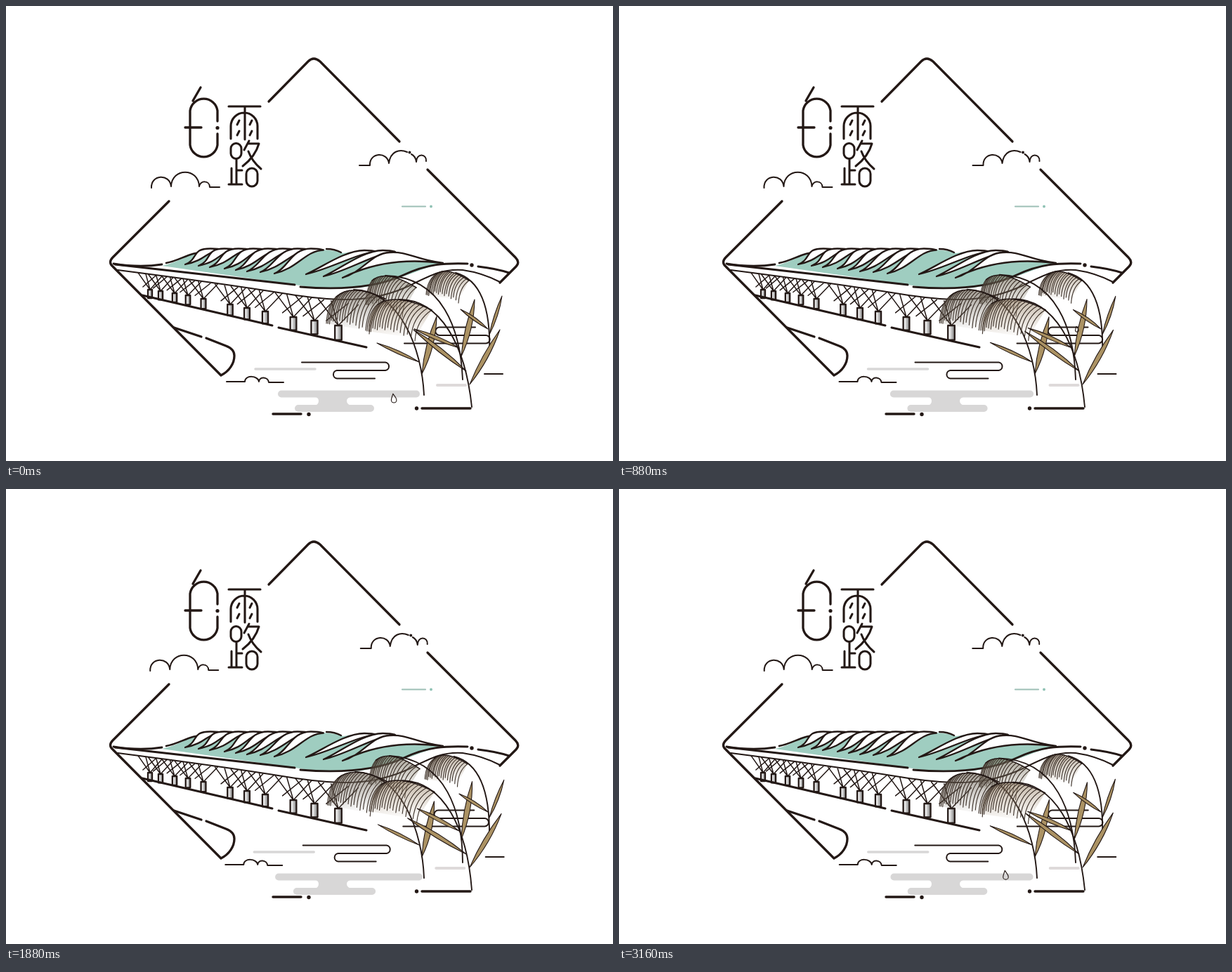
These frames come from a looping animation (864x648 px, 3200 ms). An HTML page with a canvas:

```html
<!DOCTYPE html>
<html lang="zh">
<head>
<meta charset="utf-8">
<style>
html, body { margin: 0; width: 100%; height: 100%; overflow: hidden; background: #fff; }
canvas { display: block; }
</style>
</head>
<body>
<canvas id="c" width="864" height="648"></canvas>
<script>
const g = document.getElementById('c').getContext('2d');
const INK = '#231815', GREY = '#d8d7d7', TEAL = '#9fcdc0', TAN = '#ab9263';
const LOOP = 3200, SWAY = 800, STEP = 40;
g.lineCap = g.lineJoin = 'round';

function line(d, w = 2, color = INK) {
  g.lineWidth = w;
  g.strokeStyle = color;
  g.stroke(new Path2D(d));
}
function area(d, color) {
  g.fillStyle = color;
  g.fill(new Path2D(d));
}
function dot(x, y, r, color = INK) {
  g.fillStyle = color;
  g.beginPath();
  g.arc(x, y, r, 0, 7);
  g.fill();
}
function shifted(dx, draw) {
  g.save();
  g.translate(dx, 0);
  draw();
  g.restore();
}
const mix = (a, b, u) => a + (b - a) * u;

function frame() {
  line('M374 136L430 79Q438 71 447 79L560 193', 3.3);
  line('M600 233L725 358Q732 365 726 371L703 394', 3.3);
  line('M232 278L152 358Q145 365 152 371L306 526C318 520 325 509 325 498C325 491 321 487 313 484L285 473', 3.3);
  line('M239 458L278 471', 3.3);
}

function title() {
  line('M277 116L266 135M262 149A19.7 19.7 0 0 1 301 149V164M301 182V198A19.7 19.7 0 0 1 262 198V149M255 173H278', 3.3);
  dot(301, 173.5, 2.6);
  line('M317 143H362M340 143V190M320 189V171A19 19 0 0 1 358 171V189', 3.1);
  line('M329 169L332 163M329 184L332 178M347 169L350 163M347 184L350 178', 3);
  line('M320 203A7.5 7.5 0 0 1 335 203V210A7.5 7.5 0 0 1 320 210Z', 3);
  line('M328 218V254M328 234H336M321 231V254M317 254H336', 3);
  line('M346 192L339 205M345 196H360Q355 214 337 228M345 207Q350 221 363 232', 3);
  line('M342 239A8 8 0 0 1 358 239V249A8 8 0 0 1 342 249Z', 3);
}

// left tip x, tip y, right end x of each roof wing
const WINGS = [[255, 368, 303], [274, 370, 323], [290, 372, 343], [311, 374, 364],
  [327, 376, 385], [343, 378, 406], [362, 379, 427], [382, 381, 446], [427, 382, 522], [452, 385, 548]];

function roof() {
  area('M222 370C250 364 258 351 285 350L300 347H450Q470 348 480 352L500 349L548 352Q590 358 625 367C600 369 570 386 530 397Q480 408 411 397Z', TEAL);
  line('M228 366C250 362 260 350 288 350', 2.6);
  WINGS.forEach(([x, y, e], i) => {
    const top = i > 7 ? 348 : 345.5;
    const d = `M${x} ${y}C${x + 20} ${y - 8} ${e - 40} ${top} ${e - 12} ${top}Q${e} ${top} ${e + 6} ${top + 2}C${e - 20} ${top + 3} ${x + 33} ${y - 7} ${x} ${y}Z`;
    area(d, '#fff');
    line(d, 2.3);
  });
  line('M456 346Q468 346 477 351', 2.3);
  const last = 'M479 387C508 379 520 352 546 351C572 349 582 361 622 366C588 362 535 359 479 387Z';
  area(last, '#fff');
  line(last, 2.3);
}

const PIERS = [[205, 404], [220, 406], [240, 409], [259, 412], [281, 417], [319, 425],
  [343, 430], [369, 435], [409, 443], [439, 448], [473, 455]];
const deckY = x => 376 + (x - 160) * 0.145;

function bridge() {
  roof();
  line('M153 367Q190 373 222 368', 2.8);
  line('M155 368L411 397M419 400C480 405 530 400 566 383C600 367 625 366 657 367', 2.9);
  dot(663, 369, 2.7);
  line('M672 371Q698 374 716 380', 3);
  line('M159 376Q300 394 400 410C470 421 520 424 575 398C605 383 622 374 650 376Q678 380 703 393', 2);
  for (const [x, y] of PIERS) {
    const s = (y - 330) / 110, r = 25 * s;
    line(`M${x - r} ${deckY(x - r)}L${x} ${y}L${x + r} ${deckY(x + r)}M${x - 9 * s} ${deckY(x - 9 * s)}L${x} ${y}M${x + r * 0.5} ${deckY(x + r * 0.5)}L${x - r * 0.6} ${y - 6 * s}`, 1.5);
  }
  for (const [x, y] of PIERS) {
    const h = 12 + (y - 404) * 0.17, w = 6 + (y - 404) * 0.07;
    const fill = g.createLinearGradient(x - w / 2, 0, x + w / 2, 0);
    fill.addColorStop(0.15, '#fff');
    fill.addColorStop(0.8, '#9a9a9a');
    const d = `M${x - w / 2} ${y}h${w}v${h}h${-w}Z`;
    area(d, fill);
    line(d, 2.3);
  }
  line('M194 412L379 455M388 458L513 486', 3);
}

function sky(u) {
  shifted(-2.5 * u, () => line('M207 259C206 240 233 238 235 257C236 230 274 230 275 257C276 248 290 248 290 258H304'));
  shifted(2.5 * u, () => {
    line('M503 227H518C517 208 543 207 545 224C547 207 560 203 571 208M577 211Q583 214 584 222C584 209 599 210 598 221');
    dot(574.5, 208.5, 2);
  });
  line('M564 285.5H597', 2.2, '#9dbfb6');
  dot(605, 285.5, 1.9, '#8fc2b4');
}

function water(u) {
  const a = 5.6 * u, b = 3 * u;
  line(`M${392 - a} 552.5H${584 + a}M${416 - b} 573H${519 + b}`, 10, GREY);
  area('M438 556Q445 557 445 562.5Q445 568 438 570H494Q485 568 485 562.5Q485 557 494 556Z', GREY);
  shifted(-2.5 * u, () => {
    line('M355 517H440', 3.5, GREY);
    line('M614 540H654', 4, '#dedada');
    line('M314 535H340C340 525 359 526 360 535C361 527 373 528 374 536H395');
    line('M668 457.5H617A5.7 5.7 0 0 0 617 469H683A5.7 5.7 0 0 1 683 480.5H567');
  });
  shifted(2.4 * u, () => {
    line('M421 507.5H540A5.8 5.8 0 0 1 540 519H471A5.8 5.8 0 0 0 471 530.5H525');
    line('M681 524H707');
  });
  line('M380 581H420M592 573H661', 3.4);
  dot(431, 581.5, 2.7);
  dot(584.5, 573, 2.7);
}

// base and stem curve, plume spine (quadratic), hair drop at both ends, sway angle
const REEDS = [
  { base: [688, 495], stem: 'C690 440 680 391 640 380', spine: [612, 382, 627, 370, 659, 391], drop: [-14, 29, -15, 28], turn: -0.03, tone: '150,130,105' },
  { base: [650, 532], stem: 'C647 462 622 386 540 384', spine: [521, 391, 540, 374, 584, 401], drop: [-9, 34, -20, 38], turn: 0.055, tone: '125,118,100' },
  { base: [595, 554], stem: 'C592 490 562 406 495 404', spine: [470, 414, 492, 394, 540, 417], drop: [-14, 38, -23, 46], turn: 0.02, tone: '120,112,100' },
  { base: [663, 571], stem: 'C654 484 619 418 560 418', spine: [529, 425, 554, 408, 606, 433], drop: [-15, 38, -24, 40], turn: 0.04, tone: '165,145,120' }
];

function reed(r, u) {
  const [bx, by] = r.base, [x0, y0, x1, y1, x2, y2] = r.spine;
  const [ax, ay, cx, cy] = r.drop;
  const ex = x0 + ax, ey = y0 + ay, fx = x2 + cx, fy = y2 + cy;
  g.save();
  g.translate(bx, by);
  g.rotate(r.turn * u);
  g.translate(-bx, -by);
  const glow = g.createLinearGradient(x1, y0 - 10, x1 + 6, y2 + cy);
  glow.addColorStop(0, `rgba(${r.tone},.72)`);
  glow.addColorStop(0.6, `rgba(${r.tone},.28)`);
  glow.addColorStop(1, `rgba(${r.tone},0)`);
  area(`M${x0} ${y0}Q${x1} ${y1} ${x2} ${y2}L${fx} ${fy}L${ex} ${ey}Q${ex + 1} ${y0 + 15} ${x0} ${y0}Z`, glow);
  const n = 17;
  for (let i = 0; i <= n; i++) {
    const k = i / n, q = 1 - k;
    const x = q * q * x0 + 2 * q * k * x1 + k * k * x2;
    const y = q * q * y0 + 2 * q * k * y1 + k * k * y2;
    const dx = mix(ax, cx, k), dy = mix(ay, cy, k) + (i % 3) * 2;
    line(`M${x} ${y}Q${x + dx * 0.9} ${y + dy * 0.3} ${x + dx} ${y + dy}`, 1.15, '#40352d');
  }
  line(`M${x0} ${y0}Q${x1} ${y1} ${x2} ${y2}`, 1.5);
  line(`M${bx} ${by}${r.stem}`, 1.9);
  g.restore();
}

// base, tip at rest, tip fully swayed, half width
const LEAVES = [
  [588, 507, 528, 480, 530, 477, 5], [592, 524, 613, 442, 608, 446, 10],
  [655, 520, 580, 461, 568, 472, 7], [645, 487, 581, 460, 587, 453, 6],
  [648, 499, 667, 418, 662, 416, 9], [660, 539, 703, 461, 706, 463, 8],
  [688, 468, 706, 413, 710, 415, 5], [686, 460, 647, 432, 644, 435, 5]
];

function leaf([bx, by, x0, y0, x1, y1, w], u) {
  const x = mix(x0, x1, u), y = mix(y0, y1, u);
  const len = Math.hypot(x - bx, y - by);
  const nx = (by - y) / len * w, ny = (x - bx) / len * w;
  const mx = (x + bx) / 2, my = (y + by) / 2;
  const d = `M${bx} ${by}Q${mx + nx} ${my + ny} ${x} ${y}Q${mx - nx * 0.7} ${my - ny * 0.7} ${bx} ${by}Z`;
  area(d, TAN);
  line(d, 1.1);
}

function drop(x, y, s, alpha) {
  g.save();
  g.globalAlpha = alpha;
  g.translate(x, y);
  g.scale(s, s);
  line('M-1 -6.5C1 -3 4 -1 4 2.5C4 7.5 -3.5 7.5 -3.5 2.5C-3.5 0 -2 -3 -1 -6.5Z', 1.1 / s);
  g.restore();
}

function drops(t) {
  if (t >= 560 && t < 1560) {
    const d = t - 600;
    drop(649 + d * 0.0095, 439 + d * 0.055 + d * d * 0.000075,
      Math.min(0.75, 0.4 + d * 0.0008), Math.min(1, (1560 - t) / 200));
  }
  const v = t < 1600 ? t + LOOP : t;
  if (v >= 2700 && v <= 3530) {
    const d = v - 2840;
    drop(538 + d * 0.035 + d * d * 0.00001, 491 + d * 0.152 + d * d * 0.0001,
      Math.min(1, 0.85 + d * 0.003), Math.min(1, (3570 - v) / 160));
  }
}

function draw(now) {
  const t = Math.floor(now % LOOP / STEP) * STEP;
  const u = 1 - Math.abs(t % SWAY / (SWAY / 2) - 1);
  g.fillStyle = '#fff';
  g.fillRect(0, 0, 864, 648);
  frame();
  title();
  sky(u);
  bridge();
  water(u);
  REEDS.forEach(r => reed(r, u));
  LEAVES.forEach(l => leaf(l, u));
  drops(t);
}

const start = performance.now();
function tick() {
  draw(performance.now() - start);
  requestAnimationFrame(tick);
}
tick();
</script>
</body>
</html>
```
